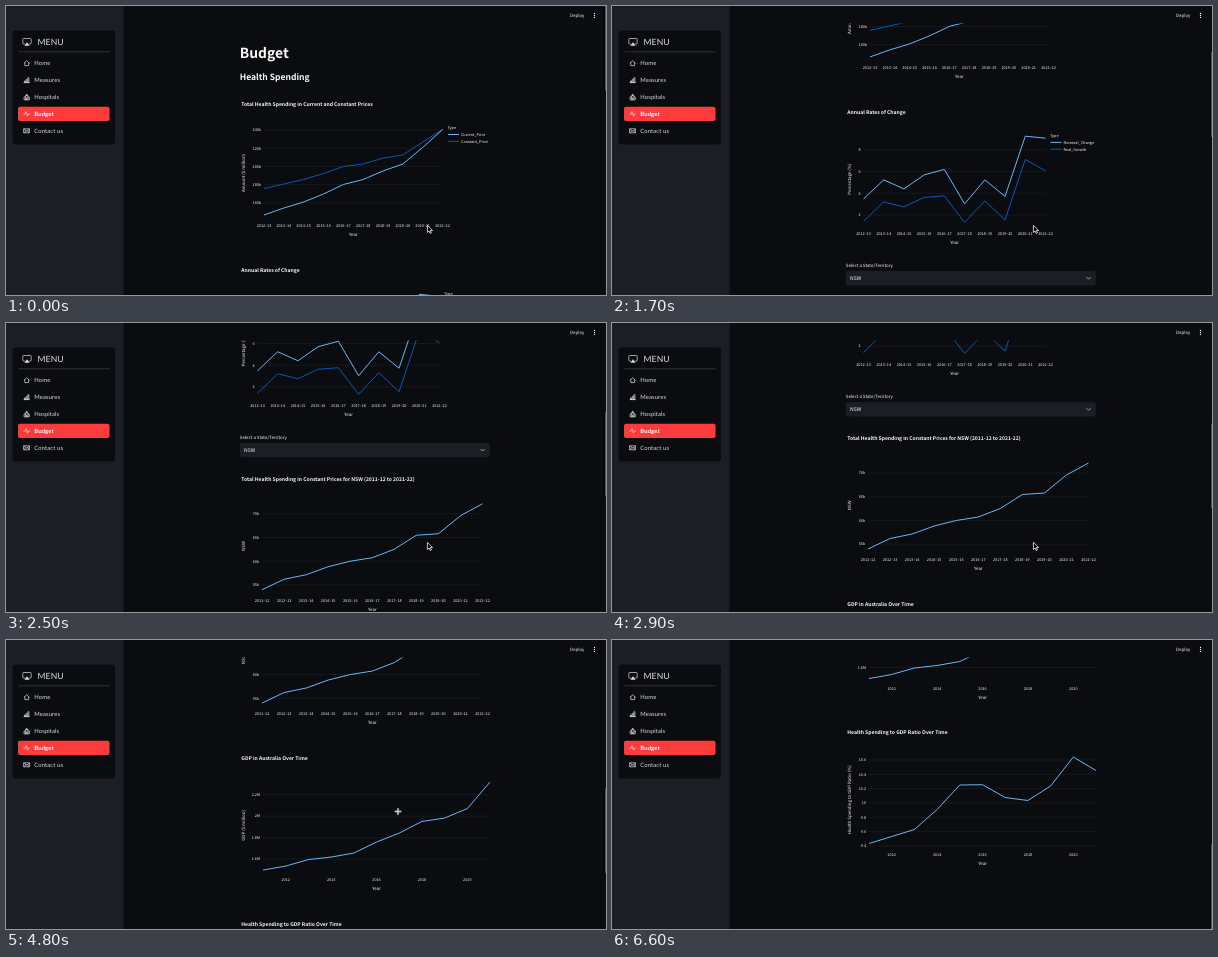
Recreate the animation shown at these times as an HTML page. Size 600 px wide and 289 px high, loop 6.9 s.

```html
<!DOCTYPE html>
<html lang="en">
<head>
<meta charset="utf-8">
<title>Budget dashboard</title>
<style>
html, body { margin: 0; width: 100%; height: 100%; overflow: hidden; background: #0b0c10; }
svg { display: block; width: 600px; height: 289px; }
text { font-family: "Noto Sans CJK JP", "Noto Sans CJK SC", "Noto Sans CJK", "Noto Sans", sans-serif; fill: #fafafa; text-rendering: geometricPrecision; }
.nav text { font-family: Lato, sans-serif; fill: #dcdde0; letter-spacing: .1px; }
.icon { fill: none; stroke: #dcdde0; stroke-width: .7; stroke-linejoin: round; stroke-linecap: round; }
.series { fill: none; stroke-width: 1; stroke-linejoin: round; }
</style>
</head>
<body>
<svg id="stage" viewBox="0 0 600 289" xmlns="http://www.w3.org/2000/svg">
  <rect width="600" height="289" fill="#0b0c10"/>
  <g id="doc"></g>
  <rect x="117" width="483" height="17.5" fill="#0b0c10"/>
  <g id="top"></g>
  <rect id="thumb" x="599" width="1" height="84.6" fill="#4b4c50"/>
  <g class="nav" id="nav">
    <rect width="117.5" height="289" fill="#1c1e26"/>
    <rect x="6.5" y="24.5" width="102.5" height="114" rx="3" fill="#0b0c10"/>
    <path d="M12.5 45.8H104" stroke="#4a4c53" stroke-width=".6"/>
    <rect x="12" y="100.8" width="91.5" height="14.2" rx="2" fill="#ff3b3e"/>
  </g>
  <path id="arrow" d="M0 0V7.2L1.7 5.7L2.8 8.2L4 7.7L2.9 5.2H5.2Z" fill="#000" stroke="#fff" stroke-width=".75" stroke-linejoin="round"/>
  <g id="cross">
    <path d="M-3.5 0H3.5M0 -3.5V3.5" stroke="#30343a" stroke-width="2.4"/>
    <path d="M-3.2 0H3.2M0 -3.2V3.2" stroke="#c3ccd4" stroke-width="1.4"/>
  </g>
</svg>
<script>
const NS = 'http://www.w3.org/2000/svg';
const $ = id => document.getElementById(id);
const doc = $('doc'), nav = $('nav');
const LIGHT = '#6cb6f5', DARK = '#0a58b2';
const LOOP = 6900;

function add(parent, tag, attrs, text) {
  const el = document.createElementNS(NS, tag);
  for (const k in attrs) el.setAttribute(k, attrs[k]);
  if (text) el.textContent = text;
  parent.appendChild(el);
  return el;
}

// Page text: size in page pixels, y is the middle of the capitals.
function label(parent, x, y, size, str, more = {}) {
  return add(parent, 'text', { x, y: y + size * .116, 'font-size': size * .316, ...more }, str);
}

const years = from => i => `${from + i}–${(from + i + 1) % 100}`;
const evenYears = i => i % 2 ? 2011 + i : '';

function chart(c) {
  const g = add(doc, 'g', { transform: `translate(0 ${c.y})` });
  const n = c.lines[0].length;
  const px = i => c.x0 + (c.x1 - c.x0) * i / (n - 1);
  label(g, 235.3, 0, 16, c.title, { 'font-weight': 700 });
  c.ticks.forEach((t, i) => {
    const y = c.top + i * c.step;
    add(g, 'path', { d: `M${c.x0} ${y}H${c.x1}`, stroke: '#202126', 'stroke-width': .6 });
    label(g, c.x0 - 3, y, 12, t, { 'text-anchor': 'end' });
  });
  for (let i = 0; i < n; i++) label(g, px(i), 122, 12, c.xText(i), { 'text-anchor': 'middle' });
  label(g, (c.x0 + c.x1) / 2, 130.5, 14, 'Year', { 'text-anchor': 'middle' });
  label(g, 0, 0, 14, c.axis, { 'text-anchor': 'middle', transform: `translate(237.5 ${c.mid || 67.3}) rotate(-90)` });
  c.lines.forEach((ys, k) => {
    const points = ys.map((y, i) => `${px(i)},${y}`).join(' ');
    add(g, 'polyline', { class: 'series', points, stroke: k === c.lines.length - 1 ? LIGHT : DARK });
  });
  if (c.legend) {
    label(g, c.lx - .5, 24, 12, 'Type');
    c.legend.forEach((name, k) => {
      const y = 30.5 + k * 6.8;
      add(g, 'path', { d: `M${c.lx} ${y}h11`, stroke: k ? DARK : LIGHT, 'stroke-width': 1 });
      label(g, c.lx + 13, y, 12, name);
    });
  }
}

label(doc, 233.8, 47.2, 44, 'Budget', { 'font-weight': 700 });
label(doc, 233.8, 70.4, 27, 'Health Spending', { 'font-weight': 600 });

chart({
  y: 98, title: 'Total Health Spending in Current and Constant Prices',
  x0: 258, x1: 436.5, xText: years(2012), axis: 'Amount ($ million)', mid: 69,
  ticks: ['240k', '220k', '200k', '180k', '160k'], top: 26, step: 18.2,
  lines: [[84.5, 80, 75.5, 69.5, 62.5, 60, 54, 51, 38, 25.5],
          [111, 104, 98, 90, 80.5, 75.5, 67, 60, 43.5, 25.5]],
  legend: ['Current_Price', 'Constant_Price'], lx: 442
});
chart({
  y: 264, title: 'Annual Rates of Change',
  x0: 251.5, x1: 433.5, xText: years(2012), axis: 'Percentage (%)',
  ticks: [8, 6, 4, 2], top: 38, step: 21.7,
  lines: [[109.5, 90, 95, 85.5, 84, 110.5, 89, 108, 47.5, 59],
          [87, 68, 77, 63, 57.5, 92, 68, 84.5, 24.3, 26.3]],
  legend: ['Nominal_Change', 'Real_Growth'], lx: 438.5
});

label(doc, 233.8, 417.8, 14, 'Select a State/Territory');
add(doc, 'rect', { x: 233.8, y: 423.2, width: 250, height: 14.4, rx: 2.5, fill: '#1c1e26' });
label(doc, 238, 430.6, 16, 'NSW');
add(doc, 'path', { class: 'icon', d: 'M474.9 429.6l1.7 1.7l1.7 -1.7' });

chart({
  y: 459, title: 'Total Health Spending in Constant Prices for NSW (2011-12 to 2021-22)',
  x0: 256, x1: 476.5, xText: years(2011), axis: 'NSW',
  ticks: ['70k', '65k', '60k', '55k'], top: 35, step: 23.7,
  lines: [[111, 100.5, 96, 88, 82.5, 79, 70.5, 56.5, 55, 37, 25]]
});
chart({
  y: 625, title: 'GDP in Australia Over Time',
  x0: 257, x1: 484, xText: evenYears, axis: 'GDP ($ million)',
  ticks: ['2.2M', '2M', '1.8M', '1.6M'], top: 36.5, step: 21.5,
  lines: [[112, 108, 101.5, 99, 95, 84, 75, 63.4, 60, 50.5, 24]]
});
chart({
  y: 791, title: 'Health Spending to GDP Ratio Over Time',
  x0: 257, x1: 484, xText: evenYears, axis: 'Health Spending to GDP Ratio (%)',
  ticks: [10.6, 10.4, 10.2, 10, 9.8, 9.6, 9.4], top: 27.5, step: 14.33,
  lines: [[111, 104, 97, 77, 52.5, 52.2, 65, 68, 53.5, 24.5, 38]]
});

// Chart toolbar, each icon around its own centre.
const bar = add(doc, 'g', { class: 'icon' });
[
  [410.5, 'M-2.6 -1.5H-1.2L-.6 -2.2H.6L1.2 -1.5H2.6V2H-2.6ZM-1 .2a1 1 0 1 0 2 0a1 1 0 1 0 -2 0'],
  [422, 'M-2.3 -.6a1.8 1.8 0 1 0 3.6 0a1.8 1.8 0 1 0 -3.6 0M.9 .8L2.5 2.4M-1.3 -.6H.3M-.5 -1.4V.2'],
  [431, 'M-2.5 0H2.5M0 -2.5V2.5M-.6 -1.9L0 -2.5L.6 -1.9M-.6 1.9L0 2.5L.6 1.9'],
  [442, 'M-2.2 -2.2H2.2V2.2H-2.2ZM-1.2 0H1.2M0 -1.2V1.2'],
  [450.5, 'M-2.2 -2.2H2.2V2.2H-2.2ZM-1.2 0H1.2'],
  [459, 'M-2.3 -2.3L2.3 2.3M2.3 -2.3L-2.3 2.3M-2.3 -1V-2.3H-1M2.3 1V2.3H1'],
  [467.5, 'M-2.5 .2L0 -2.2L2.5 .2M-1.7 0V2.1H-.5V.8H.5V2.1H1.7V0'],
  [478.3, 'M-2 -.8V-2H-.8M.8 -2H2V-.8M2 .8V2H.8M-.8 2H-2V.8']
].forEach(([x, d], i) =>
  add(bar, 'path', { d, transform: `translate(${x} 450)`, stroke: i === 1 ? '#a9abaf' : '#5b5d62' }));

label($('top'), 564, 9.4, 14, 'Deploy');
for (const y of [7.4, 9.4, 11.4]) add($('top'), 'circle', { cx: 588.5, cy: y, r: .65, fill: '#fafafa' });

add(nav, 'path', { class: 'icon', d: 'M18.6 38H17.6Q16.8 38 16.8 37.2V33.3Q16.8 32.5 17.6 32.5H24.4Q25.2 32.5 25.2 33.3V37.2Q25.2 38 24.4 38H23.4' });
add(nav, 'path', { d: 'M21 36.2L23.6 39.8H18.4Z', fill: '#dcdde0' });
add(nav, 'text', { x: 31.5, y: 39, 'font-size': 8.6 }, 'MENU');
[
  ['Home', 'M-2.6 0L0 -2.5L2.6 0M-1.9 -.5V2.4H1.9V-.5'],
  ['Measures', 'M-2.7 2.5H2.7M-2.2 2.5V.8H-1.2V2.5M-.5 2.5V-.7H.5V2.5M1.2 2.5V-2.4H2.2V2.5'],
  ['Hospitals', 'M-2.6 2.5V0H-1.3V-1.3H1.3V0H2.6V2.5ZM-1.3 0V2.5M1.3 0V2.5M0 -2.7V-1.3M-.6 -2H.6M-.4 2.5V.9H.4V2.5'],
  ['Budget', 'M-2.8 .2H-1.6L-.7 -2.3L.8 2.3L1.6 .2H2.8'],
  ['Contact us', 'M-2.7 -2H2.7V2H-2.7ZM-2.7 -1.6L0 .4L2.7 -1.6M-2.6 1.9L-.8 -.1M2.6 1.9L.8 -.1']
].forEach(([name, d], i) => {
  const y = 57.2 + i * 16.9, on = name === 'Budget';
  add(nav, 'path', { class: 'icon', d, transform: `translate(20.7 ${y})` });
  const t = add(nav, 'text', { x: 28.3, y: y + 2.1, 'font-size': 5.9, 'font-weight': on ? 700 : 400 }, name);
  if (on) t.style.fill = '#fff';
});

// Scroll position keys [ms, px], joined by a monotone cubic.
const keys = [[0, 0], [700, 0], [1000, 30], [2200, 252], [2900, 344], [4200, 344],
              [4300, 354], [5400, 686], [5600, 698.5], [LOOP, 698.5]];
const slope = i => (keys[i + 1][1] - keys[i][1]) / (keys[i + 1][0] - keys[i][0]);
function tangent(i) {
  if (!i || i === keys.length - 1) return 0;
  const a = slope(i - 1), b = slope(i);
  return a * b > 0 ? 2 * a * b / (a + b) : 0;
}
function scrollAt(t) {
  let i = 0;
  while (i < keys.length - 2 && t >= keys[i + 1][0]) i++;
  const [t0, a] = keys[i], [t1, b] = keys[i + 1];
  const h = t1 - t0, u = (t - t0) / h, v = 1 - u;
  return a * (1 + 2 * u) * v * v + b * u * u * (3 - 2 * u)
    + h * u * v * (tangent(i) * v - tangent(i + 1) * u);
}

const show = (el, on) => el.setAttribute('visibility', on ? 'visible' : 'hidden');
const move = (el, x, y) => el.setAttribute('transform', `translate(${x} ${y})`);

function draw(ms) {
  const t = Math.floor(ms / 100) * 100;
  const s = scrollAt(t);
  move(doc, 0, -s);
  $('thumb').setAttribute('y', s * 204.4 / 698.5);
  show(bar, t >= 3700 && t < 4500);

  const u = Math.min(1, Math.max(0, (t - 3500) / 500));
  const e = u * u * (3 - 2 * u);
  move($('arrow'), 421.4, 219.3);
  move($('cross'), 422 - 30 * e, 221 - 49.5 * e);
  show($('arrow'), t < 3600);
  show($('cross'), t >= 3600 && t < 5900);
}

const start = performance.now();
function tick() {
  draw((performance.now() - start) % LOOP);
  requestAnimationFrame(tick);
}
draw(0);
tick();
</script>
</body>
</html>
```
